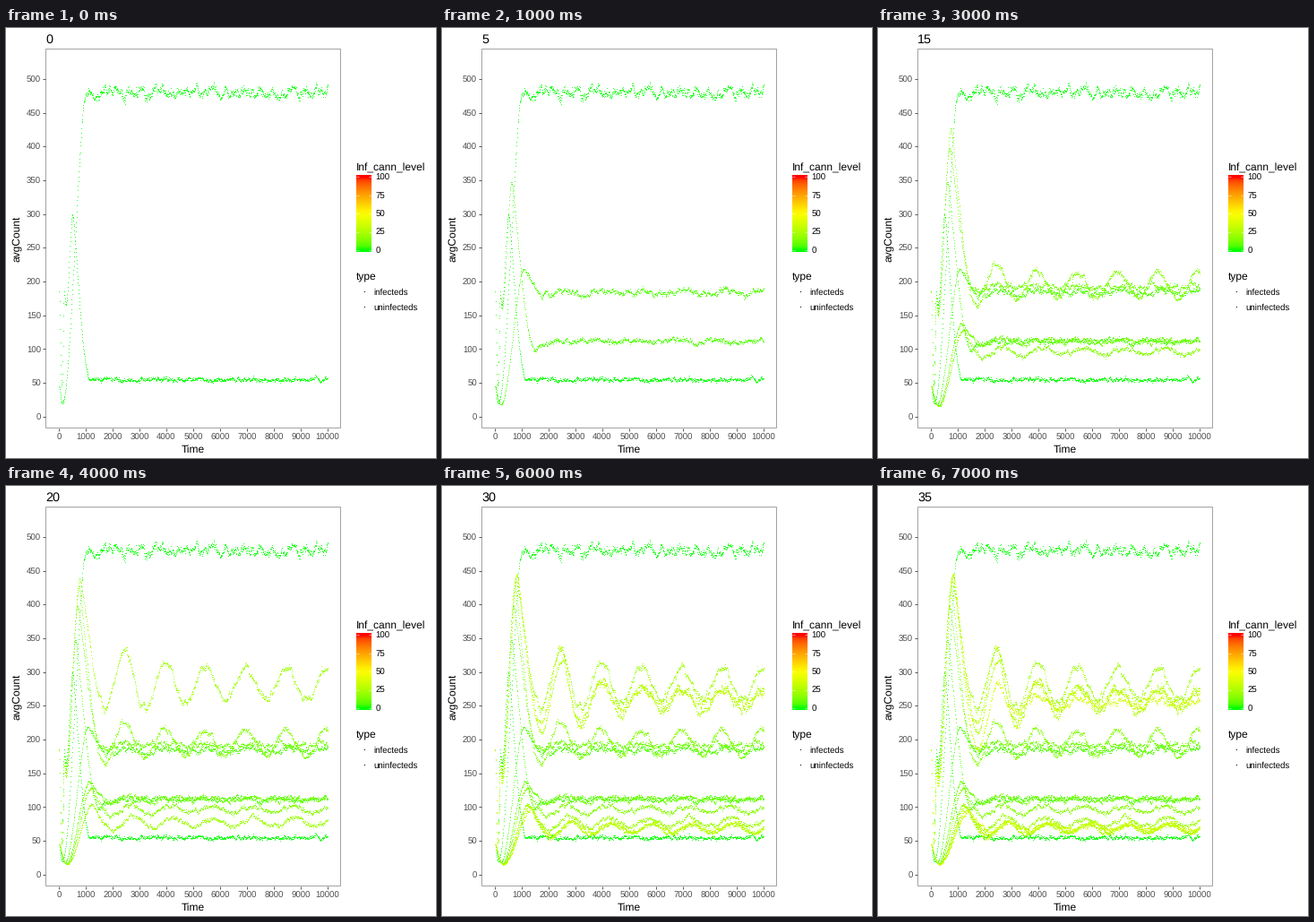
Recreate the animation shown at these times as a matplotlib script. Size 480 px wide and 480 px high, loop 8 s.

```python
import numpy as np
import matplotlib.pyplot as plt
from matplotlib.animation import FuncAnimation
from matplotlib.patches import Rectangle

plt.rcParams["font.family"] = "Liberation Sans"
plt.rcParams["text.hinting"] = "none"
SIZE, DPI = 480, 72
T = np.arange(10, 10001, 10)

# ---- colour scale: green, yellow, red blended in CIE Lab ----
M = np.array([[0.4124, 0.3576, 0.1805],
              [0.2126, 0.7152, 0.0722],
              [0.0193, 0.1192, 0.9505]])
WHITE = M.sum(axis=1)


def to_lab(rgb):
    x, y, z = np.cbrt(M @ np.array(rgb) / WHITE)
    return np.array([116 * y - 16, 500 * (x - y), 200 * (y - z)])


def from_lab(lab):
    y = (lab[0] + 16) / 116
    f = np.array([y + lab[1] / 500, y, y - lab[2] / 200])
    xyz = WHITE * np.where(f > 6 / 29, f ** 3, (f - 4 / 29) * 0.1284)
    lin = np.clip(np.linalg.solve(M, xyz), 0, 1)
    return np.where(lin > 0.0031, 1.055 * lin ** (1 / 2.4) - 0.055, 12.92 * lin)


STOPS = [to_lab(c) for c in ((0, 1, 0), (1, 1, 0), (1, 0, 0))]


def level_color(level):
    i = 0 if level < 50 else 1
    k = level / 50 - i
    return from_lab(STOPS[i] * (1 - k) + STOPS[i + 1] * k)


# ---- population model ----
PERIOD = 1500


def ease_path(keys):
    """Ease from extreme to extreme; falls start faster than rises."""
    t, v = np.array(keys, float).T
    i = np.clip(np.searchsorted(t, T, side="right") - 1, 0, len(t) - 2)
    s = np.clip((T - t[i]) / (t[i + 1] - t[i]), 0, 1)
    s = np.where(v[i + 1] < v[i], s ** 0.7, s)
    return v[i] + (v[i + 1] - v[i]) * s * s * (3 - 2 * s)


def wobble(rng, sd):
    kernel = np.exp(-np.arange(30) / 6)
    kernel /= np.sqrt((kernel ** 2).sum())
    drift = np.convolve(rng.normal(size=len(T) + 29), kernel, "valid")
    return (sd * drift + rng.normal(size=len(T))) * np.clip(T / 1500, 0.1, 1)


def curve(rng, keys, mean, swing):
    """Eased start, then an oscillation that settles around the mean."""
    t0, v0 = keys[-1]
    age = np.maximum(T - t0, 0)
    size = swing + (v0 - mean - swing) * np.exp(-age / 900)
    tail = mean + size * np.cos(2 * np.pi * age / PERIOD)
    return np.where(T > t0, tail, ease_path(keys)) + wobble(rng, 1 + mean / 110)


def approach(level, scale, power=1):
    return 1 - np.exp(-(level / scale) ** power)


def prey(rng, level, mean, trough, rebound, swing):
    peak_t = 510 + 360 * approach(level, 14)
    trough_t = 1150 + 580 * approach(level, 6)
    keys = [(10, 185), (110, 46), (200, 185 - level), (255, 165 - level),
            (peak_t, 299 + 146 * approach(level, 9, 1.5)),
            (trough_t, trough), (trough_t + PERIOD / 2, rebound)]
    return curve(rng, keys, mean, swing)


def hunters(rng, level, peak, mean, swing):
    low = approach(level, 8)
    peak_t = 1040 + 11 * level
    keys = [(10, 45), (130 + 190 * low, 20 - 5 * low), (peak_t, peak),
            (peak_t + PERIOD / 2, mean - 2 * swing),
            (peak_t + PERIOD, mean + 1.5 * swing)]
    return curve(rng, keys, mean, swing)


# per level: prey mean, trough, rebound, swing; hunter peak, mean, swing
LEVELS = [
    ((55, 55, 55, 0), (480, 480, 0)),
    ((112, 101, 112, 2), (218, 184, 2)),
    ((193, 186, 195, 2), (138, 112, 2)),
    ((196, 163, 226, 20), (127, 97, 5)),
    ((282, 248, 334, 24), (105, 78, 6)),
    ((260, 212, 318, 17), (100, 68, 7)),
    ((262, 224, 340, 10), (97, 70, 6)),
    ((255, 186, 284, 6), (95, 71, 4)),
]


def px(t):
    return 59 + 0.03 * np.asarray(t)


def py(v):
    return 434.3 - 0.7536 * np.asarray(v)


fig = plt.figure(figsize=(SIZE / DPI, SIZE / DPI), dpi=DPI, facecolor="white")
ax = fig.add_axes([0, 0, 1, 1])
ax.axis("off")

layers = []
for n, (prey_args, hunter_args) in enumerate(LEVELS):
    rng = np.random.default_rng(40 + n)
    both = [prey(rng, 5 * n, *prey_args), hunters(rng, 5 * n, *hunter_args)]
    dots, = ax.plot(np.tile(px(T), 2), py(np.concatenate(both)) + 0.4, ",",
                    color=level_color(5 * n), alpha=0.8, zorder=3)
    layers.append(dots)


# ---- frame, axes and legend ----
def label(x, y, s, size=9.6, color="black", **kw):
    return ax.text(x, y, s, size=size, color=color, **kw)


def line(x, y, color="#333333", width=0.8):
    ax.plot(x, y, color=color, lw=width, solid_capstyle="butt", zorder=4)


GRAY = "#4d4d4d"
ax.add_patch(Rectangle((44, 23), 329, 423, fill=False, ec="#a3a3a3", lw=1))
for v in range(0, 501, 50):
    line([41, 44], [py(v) - 0.5] * 2)
    label(39, py(v) + 3.5, str(v), color=GRAY, ha="right")
for t in range(0, 10001, 1000):
    line([px(t) - 0.5] * 2, [447, 450])
    label(px(t), 460.4, str(t), color=GRAY, ha="center")
label(209, 474, "Time", 12, ha="center")
label(11.5, 235.5, "avgCount", 12, rotation=90, ha="center", va="center")

label(390.6, 159.6, "Inf_cann_level", 12)
ramp = np.array([[level_color(v)] for v in np.linspace(100, 0, 20)])
ax.imshow(ramp, extent=(391, 408, 250, 164), aspect="auto",
          interpolation="bilinear", zorder=2)
for v in range(0, 101, 25):
    y = 248 - 0.82 * v
    line([391, 394.4], [y, y], "white", 0.5)
    line([404.6, 408], [y, y], "white", 0.5)
    label(412.6, y + 3.7, str(v))

label(390.6, 281.6, "type", 12)
for y, name in ((294.5, "infecteds"), (311.5, "uninfecteds")):
    ax.plot(399.5, y, ",", color="black")
    label(410, y + 3.5, name)

title = label(44, 17, "0", 14.4)
ax.set_xlim(0, SIZE)
ax.set_ylim(SIZE, 0)


def update(i):
    title.set_text(str(5 * i))
    for k, dots in enumerate(layers):
        dots.set_visible(k <= i)
    return [title, *layers]


anim = FuncAnimation(fig, update, frames=len(layers), interval=1000,
                     repeat=True, repeat_delay=0, blit=False)
plt.show()
```
